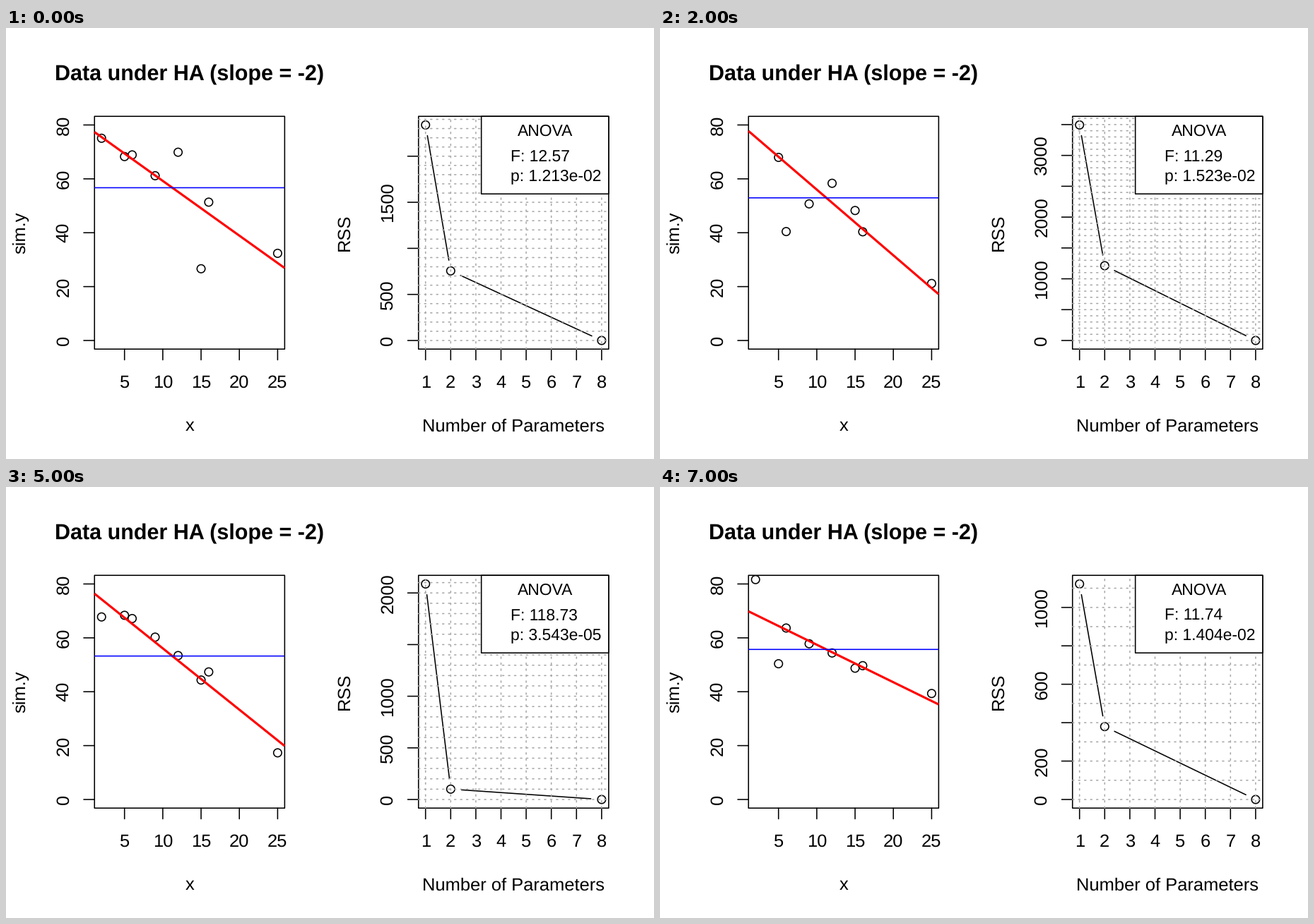
A matplotlib script for the animation above (8000 ms loop, 917 by 611 pixels).

```python
import numpy as np
import matplotlib.pyplot as plt
from matplotlib.animation import FuncAnimation
from matplotlib.patches import Circle, Rectangle

W, H, DPI = 917, 611, 64
PT = 72 / DPI                  # points per pixel
LINE = W / 2 / 15.01           # height of one margin line
FONT = LINE / 1.2
THIN = LINE / 19.2
TOP, BOTTOM = 4.1 * LINE, H - 5.1 * LINE
PLOT_W = W / 2 - 6.2 * LINE
LEFTS = 4.1 * LINE, W / 2 + 4.1 * LINE

X = np.array([2, 5, 6, 9, 12, 15, 16, 25])
DX = X - X.mean()
DF = len(X) - 2

# mean, slope, F, and the x of the points furthest above and below the fit
RUNS = [
    (56.7, -2.032, 12.574, 12, 15),
    (59.0, -1.868, 72.39, 15, 2),
    (52.95, -2.439, 11.29, 2, 6),
    (52.8, -1.6535, 6.713, 9, 12),
    (53.9, -2.01, 31.74, 6, 9),
    (53.25, -2.276, 118.73, 16, 2),
    (52.6, -2.047, 62.02, 9, 12),
    (55.7, -1.3915, 11.738, 2, 5),
]

plt.rcParams.update({"font.family": "Liberation Sans", "text.hinting": "none"})
fig = plt.figure(figsize=(W / DPI, H / DPI), dpi=DPI, facecolor="white")
ax = fig.add_axes([0, 0, 1, 1])


def simulate(slope, f, high, low, seed):
    """Return residuals and both RSS values that give exactly this fit and F."""
    ssr = slope ** 2 * (DX ** 2).sum()
    rss = ssr * DF / f
    noise = 0.2 * np.random.default_rng(seed).standard_normal(len(X))
    noise += 1.0 * (X == high) - 1.4 * (X == low)
    noise -= np.polyval(np.polyfit(X, noise, 1), X)
    return noise * np.sqrt(rss / (noise ** 2).sum()), ssr + rss, rss


def p_value(f):
    """Upper tail of the F distribution with 1 and 6 degrees of freedom."""
    c = DF / (DF + f)
    return 1 - np.sqrt(1 - c) * (1 + c / 2 + 3 * c ** 2 / 8)


def text(x, y, s, size=FONT, ha="center", **kw):
    ax.text(x, y, s, fontsize=size * PT, ha=ha, va="baseline",
            rotation_mode="anchor", zorder=5, **kw)


def line(xs, ys, color="black", width=THIN, **kw):
    kw = {"solid_capstyle": "round", "zorder": 2, **kw}
    ax.plot(xs, ys, color=color, lw=width * PT, snap=False, **kw)


def box(x, y, w, h, fill="none", z=4):
    rect = Rectangle((x, y), w, h, fc=fill, ec="black", lw=THIN * PT,
                     joinstyle="round", snap=False, zorder=z)
    return ax.add_patch(rect)


def circles(xs, ys, frame):
    for xy in zip(xs, ys):
        dot = Circle(xy, 0.225 * FONT, fc="none", ec="black",
                     lw=THIN * PT, zorder=2)
        ax.add_patch(dot).set_clip_path(frame)


def scale(lo, hi, start, end):
    """Map lo..hi to pixels, leaving 4 % of the range free at both ends."""
    pad = 0.04 * (hi - lo)
    return lambda v: start + (v - lo + pad) / (hi - lo + 2 * pad) * (end - start)


def x_axis(ticks, sx, title, left):
    for t in ticks:
        line([sx(t)] * 2, [BOTTOM, BOTTOM + LINE / 2])
        text(sx(t), BOTTOM + 1.8 * LINE, str(t))
    text(left + PLOT_W / 2, BOTTOM + 3.8 * LINE, title)


def y_axis(ticks, sy, title, left):
    """Draw all ticks, but skip labels that would crowd the one below."""
    free = -np.inf
    for t in ticks:
        y, up = sy(t), BOTTOM - sy(t)
        line([left - LINE / 2, left], [y, y])
        half = 0.278 * FONT * len(str(t))
        if up - half >= free:
            text(left - 1.2 * LINE, y, str(t), rotation=90)
            free = up + half + 0.833 * FONT
    text(left - 3.2 * LINE, (TOP + BOTTOM) / 2, title, rotation=90)


def draw_data(mean, slope, residuals):
    left = LEFTS[0]
    right = left + PLOT_W
    sx, sy = scale(2, 25, left, right), scale(0, 80, BOTTOM, TOP)
    frame = box(left, TOP, PLOT_W, BOTTOM - TOP, z=1)
    x_axis(range(5, 26, 5), sx, "x", left)
    y_axis(range(0, 81, 20), sy, "sim.y", left)
    text(left + PLOT_W / 2, 74, "Data under HA (slope = -2)",
         1.2 * FONT, weight="bold")

    circles(sx(X), sy(mean + slope * DX + residuals), frame)
    ends = np.array([2 - 0.92, 25 + 0.92])
    line(sx(ends), sy(mean + slope * (ends - X.mean())), "red", 2 * THIN,
         zorder=3, solid_capstyle="butt")
    line([left, right], [sy(mean)] * 2, "blue", zorder=3,
         solid_capstyle="butt")


def draw_rss(rss0, rss1, f):
    left = LEFTS[1]
    right = left + PLOT_W
    sx, sy = scale(1, 8, left, right), scale(0, rss0, BOTTOM, TOP)
    top = int(1.04 * rss0)
    frame = box(left, TOP, PLOT_W, BOTTOM - TOP, z=1)
    x_axis(range(1, 9), sx, "Number of Parameters", left)
    y_axis(range(0, top + 1, 200 if top < 1200 else 500), sy, "RSS", left)

    pts = np.column_stack([sx(np.array([1, 2, 8])),
                           sy(np.array([rss0, rss1, 0]))])
    circles(*pts.T, frame)
    for a, b in zip(pts, pts[1:]):
        gap = (b - a) / np.hypot(*(b - a)) * LINE / 2
        line(*np.array([a + gap, b - gap]).T)

    dots = dict(color="darkgray", ls=(0, (4 / 3, 4)), dash_capstyle="round",
                zorder=3)
    for v in range(0, top + 1, 100):
        line([left, right], [sy(v)] * 2, **dots)
    for v in range(1, 9):
        line([sx(v)] * 2, [BOTTOM, TOP], **dots)
    draw_legend(right, f)


def draw_legend(right, f):
    size, row, char = 0.9 * FONT, 0.9 * LINE, 0.81 * FONT
    width = 5.615 * size + 2.5 * char
    left = right - width
    box(left, TOP, width, 4 * row, "white")
    text(left + width / 2, TOP + row, "ANOVA", size)
    for i, s in enumerate([f"F: {f:.2f}", f"p: {p_value(f):.3e}"]):
        text(left + 2 * char, TOP + (2 + i) * row + 0.36 * size, s, size, "left")


def update(i):
    ax.clear()
    ax.set(xlim=(0, W), ylim=(H, 0))
    ax.axis("off")
    mean, slope, f, high, low = RUNS[i]
    residuals, rss0, rss1 = simulate(slope, f, high, low, seed=i)
    draw_data(mean, slope, residuals)
    draw_rss(rss0, rss1, f)
    return []


anim = FuncAnimation(fig, update, frames=len(RUNS), interval=1000,
                     init_func=lambda: update(0), repeat=True, repeat_delay=0)
plt.show()
```
